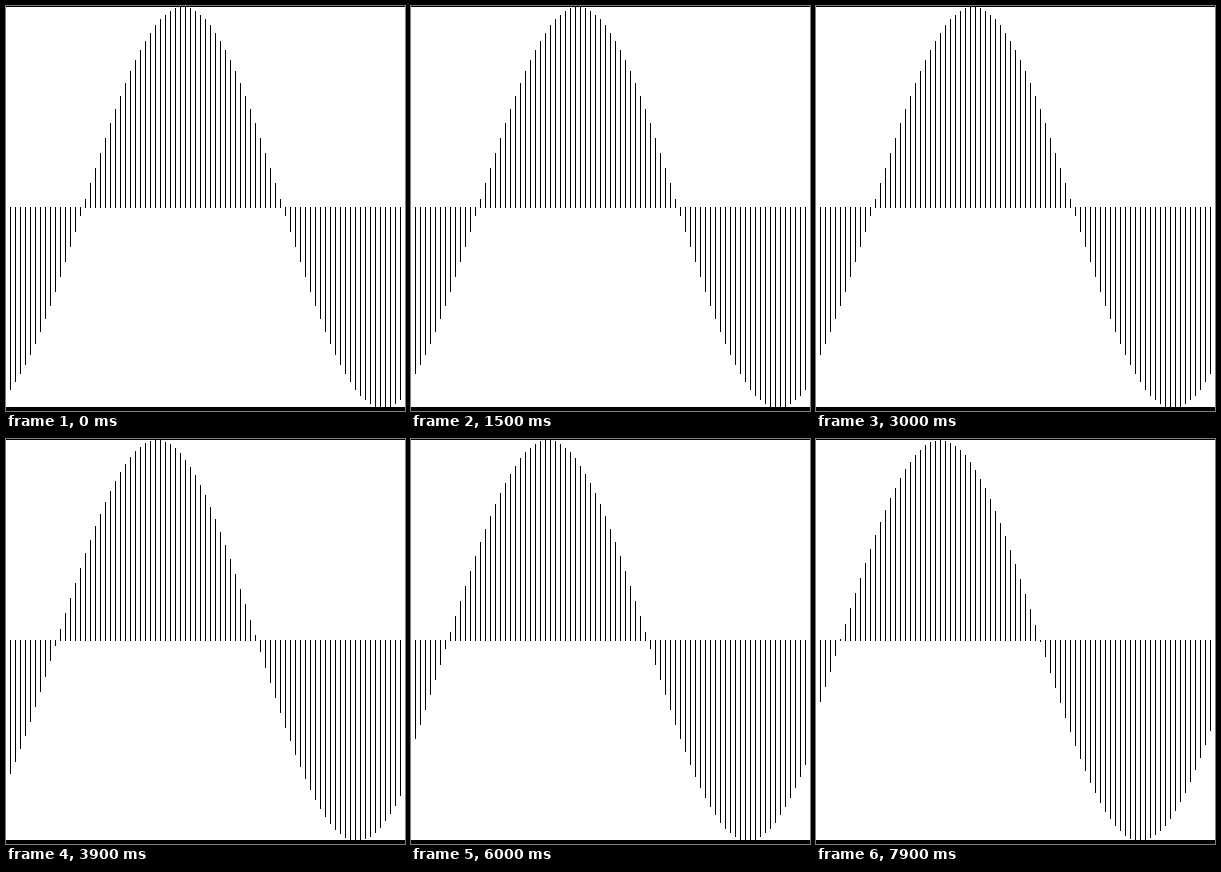
Write an HTML page with a canvas that moves like this. It is 399x405 px and loops after 8 s.

```html
<!DOCTYPE html>
<html>
<head>
<meta charset="utf-8">
<style>
html, body { margin: 0; width: 100%; height: 100%; overflow: hidden; background: #fff; }
canvas { display: block; }
</style>
</head>
<body>
<canvas id="stage" width="399" height="405"></canvas>
<script>
const ctx = document.getElementById('stage').getContext('2d');
const LOOP = 8000, STEP = 100;
const MID = 201, AMP = 200, WAVELENGTH = 400, START = 76.5, SHIFT = 2 / 3;

function draw(step) {
  ctx.fillStyle = '#fff';
  ctx.fillRect(0, 0, 399, 405);
  ctx.fillStyle = '#000';
  const zero = START - step * SHIFT;
  for (let x = 4; x < 399; x += 5) {
    const y = Math.round(MID - AMP * Math.sin((x - zero) * 2 * Math.PI / WAVELENGTH));
    ctx.fillRect(x, Math.min(y, MID), 1, Math.abs(y - MID) + 1);
  }
  ctx.fillRect(0, 0, 399, 1);
  ctx.fillRect(0, 401, 399, 4);
}

const begin = performance.now();
function tick() {
  draw(Math.floor((performance.now() - begin) % LOOP / STEP));
  requestAnimationFrame(tick);
}
tick();
</script>
</body>
</html>
```
